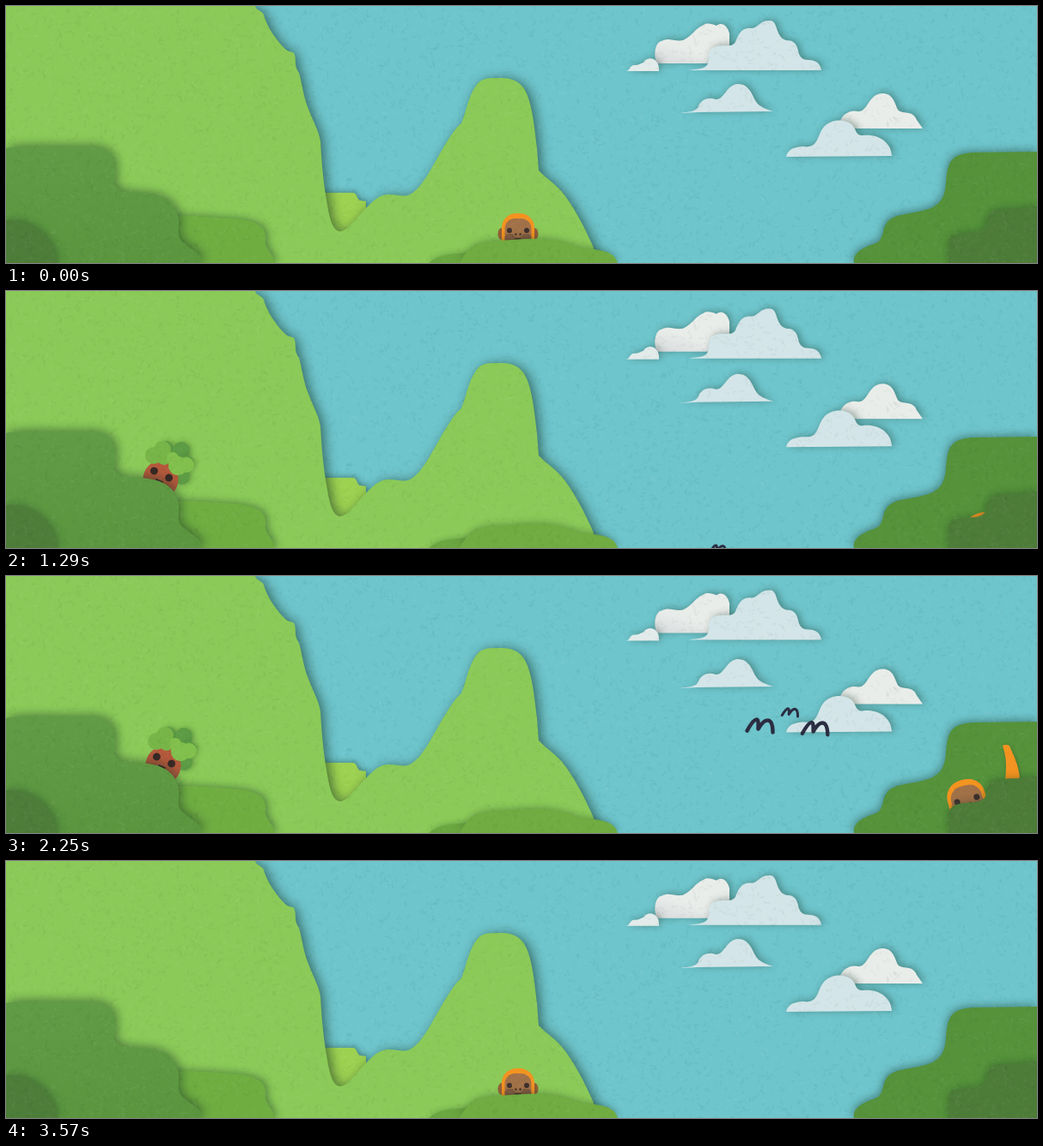
Recreate the animation shown at these times as an HTML page with a canvas. Size 1200 by 300 pixels, loop 3.6 s.

```html
<!DOCTYPE html>
<html lang="en">
<head>
<meta charset="utf-8">
<title>Paper forest</title>
<style>
html, body { margin: 0; width: 100%; height: 100%; overflow: hidden; background: #6ec5cc; }
canvas { display: block; width: 1200px; height: 300px; }
</style>
</head>
<body>
<canvas id="stage" width="1200" height="300"></canvas>
<script>
const LOOP = 3600, STEP = 30;
const c = document.getElementById('stage').getContext('2d');
const path = d => new Path2D(d);

const hills = {
  patch: path('M366 218H404C409 219 408 225 412 227L419 228V240L400 275H366Z'),
  main: path('M0 0H290C291 5 297 5 300 10C303 24 317 43 326 51C331 55 335 52 336 57C338 63 335 70 341 78' +
    'C345 92 346 106 352 120C357 134 364 145 366 158C367 177 369 205 374 232C377 249 380 262 389 263' +
    'C399 262 408 246 420 235C428 227 434 220 446 220C456 220 464 224 472 219C485 211 496 188 508 167' +
    'C516 154 524 141 530 137C536 122 538 106 547 93C553 84 561 84 572 84C585 84 594 85 602 95' +
    'C612 109 615 140 618 166L620 192C630 203 640 207 651 222C664 240 674 260 683 280L690 300H0Z')
};
const bushes = {
  leftBack: path('M190 246C215 243 240 247 262 248C290 250 303 257 302 270C300 283 309 287 314 300H190Z'),
  left: path('M0 166C20 162 60 165 92 164C115 163 127 172 127 190C128 203 123 206 130 213C140 219 150 217 165 219' +
    'C188 222 199 234 201 249C202 263 198 268 206 276C218 287 227 286 228 300H0Z'),
  leftFront: path('M0 250C24 246 50 264 57 286L61 300H0Z'),
  midBack: path('M492 300C503 290 518 289 540 288V300Z'),
  mid: path('M528 300C537 285 541 275 572 274C594 273 606 271 627 272C655 274 662 283 684 284C701 286 709 290 712 300Z'),
  right: path('M987 300C985 290 994 283 1012 277C1021 274 1020 262 1024 255C1031 242 1050 244 1070 238' +
    'C1090 233 1093 220 1094 206C1096 180 1101 173 1125 171L1200 170V300Z'),
  rightFront: path('M1097 300V280C1097 266 1110 265 1128 264C1142 262 1141 254 1143 246C1147 235 1160 237 1180 236L1200 234V300Z')
};
const clouds = {
  a1: path('M757 67C753 52 757 42 763 41C772 36 778 42 788 40C800 34 802 26 812 22C816 19 822 21 827 23' +
    'C833 18 840 23 842 32V60L816 67Z'),
  a2: path('M795 75C805 73 812 74 816 69C820 62 815 55 822 49C832 43 845 50 849 42C852 34 856 24 868 26' +
    'C876 25 878 16 890 17C899 18 895 36 908 40C916 40 920 43 922 52C923 60 928 63 934 63C944 63 948 68 949 75Z'),
  a3: path('M721 76C727 76 725 69 732 69C737 69 738 67 742 66C745 60 754 60 757 65C760 68 760 72 760 76Z'),
  b: path('M785 125C795 123 803 124 806 117C809 109 818 106 826 109C836 110 838 92 852 91C864 91 868 102 872 110' +
    'C876 118 886 121 893 123L805 124Z'),
  c1: path('M971 134C975 125 983 121 992 123C1003 124 1004 102 1020 102C1032 102 1034 112 1038 121' +
    'C1043 127 1056 121 1060 133L1067 143H985Z'),
  c2: path('M908 176C910 166 920 164 930 164C946 166 944 150 952 141C960 132 975 131 984 138C990 143 988 151 997 151' +
    'C1010 149 1030 155 1031 175Z')
};
const wings = path('M-15 5C-11 -2 -7 -8 -4 -8C-1 -8 -2 0 -2 3C2 -4 6 -8 10 -7C14 -6 15 2 15 7');
const arm = path('M-9 -20Q-5 -22 -1 -20C3 -10 10 2 11 20V28H-7C-5 10 -3 -2 -9 -20Z');

// Keys are [time, ...values]
const monkeyKeys = [[0, 242], [500, 242], [720, 245], [1150, 277], [2150, 277], [2610, 261], [3090, 251], [3500, 242.3], [3600, 242]];
const sproutKeys = [[0, 138, 266], [200, 140, 264], [720, 159, 236], [1150, 179, 217], [1290, 180, 217], [1890, 182, 220],
  [2610, 184, 216], [2680, 184, 216], [3180, 145, 264], [3600, 138, 266]];
const peekKeys = [[0, 1145, 325], [1100, 1145, 310], [1290, 1139, 282], [1700, 1119, 262], [1890, 1119, 262],
  [2610, 1118, 260], [2800, 1118, 260], [3090, 1129, 278], [3300, 1143, 310], [3600, 1145, 325]];
const armKeys = [[0, 1166, 300, 0], [1300, 1166, 285, 0], [1700, 1166, 218, -0.03], [1890, 1166, 218, -0.03],
  [2610, 1172, 218, 0.02], [2800, 1172, 218, 0], [3090, 1177, 234, -0.12], [3400, 1180, 290, -0.1], [3600, 1166, 300, 0]];

function at(keys, t) {
  const i = keys.findIndex(k => k[0] > t);
  const [a, b] = [keys[i - 1], keys[i]];
  const u = (t - a[0]) / (b[0] - a[0]);
  return a.slice(1).map((v, n) => v + (b[n + 1] - v) * u);
}

function placed(x, y, angle, scale, draw) {
  c.save();
  c.translate(x, y);
  c.rotate(angle);
  c.scale(scale, scale);
  draw();
  c.restore();
}

function paper(shape, color, dx = 3, dy = 2, blur = 10, alpha = 0.45) {
  c.save();
  c.shadowColor = `rgba(20,50,35,${alpha})`;
  c.shadowOffsetX = dx;
  c.shadowOffsetY = dy;
  c.shadowBlur = blur;
  c.fillStyle = color;
  c.fill(shape);
  c.restore();
}

function dot(x, y, rx, color, ry = rx) {
  c.fillStyle = color;
  c.beginPath();
  c.ellipse(x, y, rx, ry, 0, 0, 7);
  c.fill();
}

function block(x, y, w, h, radii, color) {
  c.fillStyle = color;
  c.beginPath();
  c.roundRect(x, y, w, h, radii);
  c.fill();
}

function ramp(x0, y0, x1, y1, from, to) {
  const g = c.createLinearGradient(x0, y0, x1, y1);
  g.addColorStop(0, from);
  g.addColorStop(1, to);
  return g;
}

function drawClouds(t) {
  const phase = 2 * Math.PI / LOOP;
  const high = 0.9 + 3 * Math.sin((t - 180) * phase);
  const low = 1 - Math.cos(t * phase);
  const pale = '#d3e5e8', white = '#e9edea';
  const put = (shape, color, dy) => placed(0, dy, 0, 1, () => paper(shape, color, 3, -1, 9, 0.4));
  put(clouds.a1, ramp(790, 48, 784, 68, white, '#dcdfe0'), high);
  put(clouds.a2, pale, high);
  put(clouds.a3, '#e2ebea', high);
  put(clouds.b, pale, low * 3.5);
  put(clouds.c1, white, low * 3.8);
  put(clouds.c2, pale, low * 3.8);
}

function drawBirds(t) {
  const x = 846 + 0.0875 * (t - 1890), y = 229 - 0.1483 * (t - 1890);
  c.strokeStyle = '#2b2d42';
  c.lineCap = c.lineJoin = 'round';
  const bird = (dx, dy, angle, scale, width) => placed(x + dx, y + dy, angle, scale, () => {
    c.lineWidth = width;
    c.stroke(wings);
  });
  bird(0, 0, 0, 1, 4.5);
  bird(64, 3, -0.02, 0.98, 4.5);
  bird(35, -16, 0.02, 0.61, 5);
}

function drawSprout(t) {
  const [x, y] = at(sproutKeys, t);
  placed(x, y, 0, 1, () => {
    c.save();
    c.shadowColor = 'rgba(20,50,20,.35)';
    c.shadowBlur = 6;
    c.shadowOffsetX = 2;
    for (const [lx, ly, r] of [[6, -33, 9], [24, -31, 10], [30, -16, 9], [24, -1, 10]]) dot(lx, ly, r, '#5d9c45');
    c.restore();
    dot(0, 3, 20.5, '#b4583b', 22);
    for (const [lx, ly, r] of [[2, -32, 10], [-8, -25, 10], [4, -23, 9]]) dot(lx, ly, r, '#78b548');
    for (const [lx, ly, r] of [[14, -22, 7], [30, -14, 9], [20, -13, 11]]) dot(lx, ly, r, '#82c04d');
    placed(1, -3, 0.44, 1, () => {
      dot(-9.5, 0, 4.5, '#382724');
      dot(9.5, 0, 4.5, '#382724');
      c.fillStyle = '#3a1f1f';
      c.beginPath();
      c.arc(1, 7, 4.6, 0, Math.PI);
      c.fill();
    });
  });
}

// Origin lies between the eyes
function monkeyHead(ears) {
  if (ears) {
    dot(-19, 4, 4.5, '#936039', 7);
    dot(19, 4, 4.5, '#936039', 7);
  }
  block(-19, -20, 38, 44, [17, 17, 15, 15], '#f39320');
  block(-15.5, -14, 31, 36, [12, 12, 14, 14], '#a17148');
  block(-15.5, 4, 31, 18, [5, 5, 14, 14], '#80593f');
  dot(0, 4, 6, '#a17148', 4);
  dot(-10, 0, 3, '#3d302c');
  dot(10, 0, 3, '#3d302c');
  dot(-2.6, 4.5, 1.3, '#49342b');
  dot(2.6, 4.5, 1.3, '#49342b');
  block(-4, 9, 8, 2, 1, '#49342b');
}

function drawPeeker(t) {
  const [x, y] = at(peekKeys, t);
  const [ax, ay, angle] = at(armKeys, t);
  placed(x, y, -0.26, 1.18, () => monkeyHead(false));
  placed(ax, ay, angle, 1, () => paper(arm, '#f39320', 1, 1, 4, 0.3));
}

function makeGrain() {
  const sheet = document.createElement('canvas');
  sheet.width = 1200;
  sheet.height = 300;
  const g = sheet.getContext('2d');
  let seed = 17;
  const rnd = () => (seed = (seed * 16807) % 2147483647) / 2147483647;
  for (let i = 0; i < 9000; i++) {
    const x = rnd() * 1200, y = rnd() * 300, a = rnd() * Math.PI, r = 2 + rnd() * 5;
    g.strokeStyle = i % 2 ? 'rgba(255,255,255,.035)' : 'rgba(0,40,30,.03)';
    g.lineWidth = 1 + rnd() * 1.5;
    g.beginPath();
    g.moveTo(x, y);
    g.lineTo(x + r * Math.cos(a), y + r * Math.sin(a));
    g.stroke();
  }
  return sheet;
}
const grain = makeGrain();

function draw(t) {
  c.fillStyle = '#6ec5cc';
  c.fillRect(0, 0, 1200, 300);
  drawClouds(t);
  drawBirds(t);
  paper(hills.patch, '#9dd251', 2, -1, 7);
  paper(hills.main, '#8bca58', 4, 1, 13, 0.6);
  paper(bushes.leftBack, '#6fad41', 3, -1, 10);
  drawSprout(t);
  paper(bushes.left, ramp(0, 165, 0, 300, '#619b45', '#5b963f'), 3, -2, 12, 0.5);
  paper(bushes.leftFront, '#4d7d39', 2, -1, 8, 0.35);
  placed(596, at(monkeyKeys, t)[0] + 20, 0, 1, () => monkeyHead(true));
  paper(bushes.midBack, '#6ba740', 0, -1, 6, 0.25);
  paper(bushes.mid, '#70ac41', 1, -1, 8, 0.35);
  paper(bushes.right, '#55923a', -1, -2, 10, 0.45);
  drawPeeker(t);
  paper(bushes.rightFront, '#4d7c38', -1, -1, 8, 0.3);
  c.drawImage(grain, 0, 0);
}

function tick() {
  draw(Math.floor(performance.now() % LOOP / STEP) * STEP);
  requestAnimationFrame(tick);
}
tick();
</script>
</body>
</html>
```
